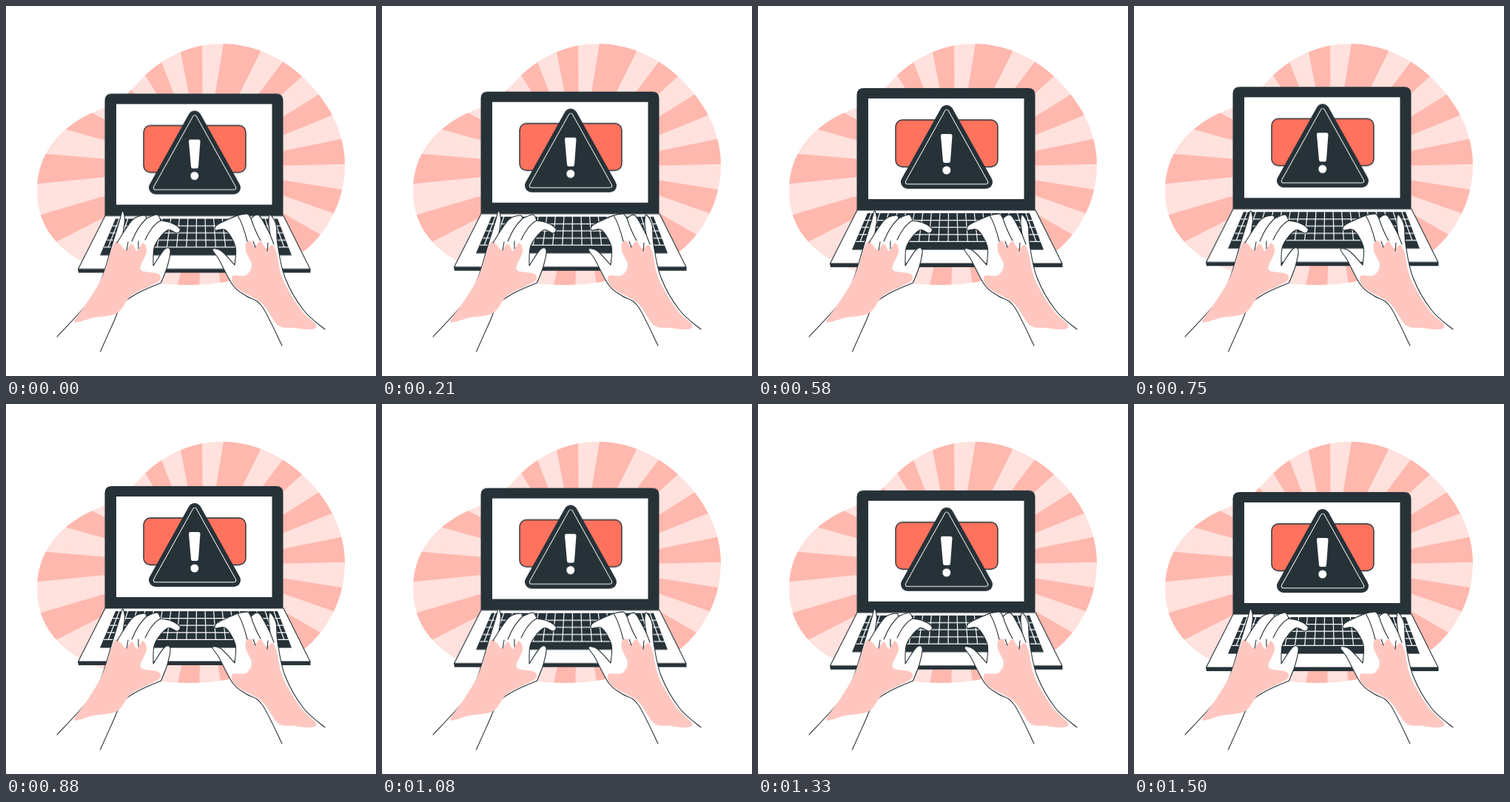
An HTML page for the animation above (1540 ms loop, 500 by 500 pixels).

```html
<!DOCTYPE html>
<html lang="en">
<head>
<meta charset="utf-8">
<title>Laptop warning</title>
<style>
  html, body { margin: 0; width: 100%; height: 100%; overflow: hidden; background: #fff; }
  svg { display: block; width: 100vw; height: 100vh; }
  .ink { fill: #263238; }
  .line { fill: none; stroke: #263238; stroke-width: 1.1; stroke-linecap: round; stroke-linejoin: round; }
  .skin { fill: #fff; }
  .shade { fill: #ffc7bf; }
  .sign { stroke-linejoin: round; }
  #laptop { animation: float 1540ms linear -40ms infinite; }
  @keyframes float { 50% { transform: translateY(-10px); } }
</style>
</head>
<body>
<svg viewBox="0 0 500 500">
  <defs>
    <path id="blob" d="M42 250C42 203 68 161 134 137C158 127 165 118 180 102C208 71 248 51 292 51C332 51 372 68 403 98C437 130 458 172 458 215C458 268 428 320 385 343C350 362 300 377 248 377C190 377 130 362 97 342C60 320 42 287 42 250Z"/>
    <clipPath id="blobClip"><use href="#blob"/></clipPath>
    <path id="triangle" d="M255 151L308 246H202Z"/>
  </defs>

  <use href="#blob" fill="#ffe1dd"/>
  <path id="rays" fill="#ffb8ae" clip-path="url(#blobClip)"/>

  <g id="laptop">
    <path class="line skin" d="M134 284H375L411 356H97.5Z"/>
    <path class="ink" d="M97 356H411.5V361H98Z"/>
    <path class="ink" d="M148 288H367L386 337.500H127Z"/>
    <path id="keys" fill="none" stroke="#fff" stroke-width="1.2"/>
    <path class="ink" d="M133.500 284V128Q133.500 119 143 119H365Q374.500 119 374.500 128V284Z"/>
    <path fill="#fff" d="M149 133H359.500V269H149Z"/>
    <rect x="186" y="162" width="138" height="63.500" rx="9" fill="#ff725e" stroke="#263238" stroke-width="1.4"/>
    <g class="sign ink">
      <use href="#triangle" stroke="#263238" stroke-width="18"/>
      <use href="#triangle" stroke="#fff" stroke-width="6.400"/>
      <use href="#triangle" stroke="#263238" stroke-width="4.600"/>
    </g>
    <path class="sign" fill="#fff" stroke="#fff" stroke-width="5" d="M249.500 183.500H260L257.500 217.500H252.500Z"/>
    <circle cx="254.800" cy="230" r="5.500" fill="#fff"/>
  </g>

  <g id="left">
    <path class="line skin"/>
    <path class="shade"/>
    <path class="line" d="M158 307L150 320M190 287Q178 298 170 318M209 290Q198 295 188 316M163 330L165 319M179 328V318"/>
  </g>
  <g id="right">
    <path class="line skin"/>
    <path class="shade"/>
    <path class="line" d="M313 283Q320 294 326 318M331 287Q336 303 344 317M357 309L362 322M337 326L334 318M353 331L354 320"/>
  </g>
</svg>
<script>
  const find = sel => document.querySelector(sel);
  const draw = (sel, d) => find(sel).setAttribute('d', d);

  // Sunburst: two fans of even wedges and a wider one in the seam between them
  const hub = { x: 266, y: 218 };
  const rim = deg => {
    const a = deg * Math.PI / 180;
    return `${hub.x + 300 * Math.cos(a)} ${hub.y - 300 * Math.sin(a)}`;
  };
  const wedge = (from, width) =>
    `M${hub.x} ${hub.y}L${rim(from)}L${rim(from + width)}Z`;
  const fan = (from, step, count) =>
    Array.from({ length: count }, (_, i) => wedge(from + i * step, step / 2)).join('');
  draw('#rays', fan(258, 20.65, 8) + wedge(63.5, 17) + fan(90.3, 21.2, 6));

  // Keyboard gaps: rows widen and columns fan out towards the viewer
  let gaps = '';
  for (let row = 1; row <= 4; row++) {
    const y = 288 + row * 9.6, spread = row * 3.9;
    gaps += `M${148 - spread} ${y}H${367 + spread}`;
  }
  for (let col = -9; col <= 9; col++) {
    gaps += `M${257.5 + col * 11.6} 288L${257 + col * 13.2} 326.3`;
  }
  draw('#keys', gaps);

  // Smooth curve through key points; "|" marks a sharp corner
  const parse = text => text.trim().split(/\s+/).map(p => p.split(',').map(Number));
  const spline = (pts, closed) => {
    const n = pts.length;
    const at = i => closed ? pts[(i + n) % n] : pts[Math.max(0, Math.min(n - 1, i))];
    let d = '';
    for (let i = 0; i < (closed ? n : n - 1); i++) {
      const [a, b, c, e] = [at(i - 1), at(i), at(i + 1), at(i + 2)];
      const p = b.map((v, k) => v + (c[k] - a[k]) / 6);
      const q = c.map((v, k) => v - (e[k] - b[k]) / 6);
      d += `C${p} ${q} ${c}`;
    }
    return d;
  };
  const outline = text => {
    const parts = text.split('|').map(parse);
    return `M${parts[0][0]}` + parts.map((part, i) =>
      spline(i ? [parts[i - 1].at(-1), ...part] : part)).join('');
  };
  const patch = text => {
    const pts = parse(text);
    return `M${pts[0]}${spline(pts, true)}Z`;
  };

  draw('#left .skin', outline(`69,447 110,402 128,372 143,324 153.5,290 157.5,277 160.5,288 158,307
    | 172,288 187,283 190,287 | 204,282 209,290
    | 223,293 235,301 231,307 218,303 201,324 199,351
    | 214,329 222,330 218,352 209.5,374 | 180,387 157,403 145,428 127.5,467`));
  draw('#left .shade', patch(`93,424 112,397 130,366 146,321 154,322 162,330 170,321
    177,331 185,320 190,332 182,356 206,362 205,373 170,391 150,415 119,421 97,427`));

  draw('#right .skin', outline(`373,459 346,406 325,392 307,378 288,343 279,329 291,331 309,350
    | 310,325 297,303 283,303 285,296 301,288 313,283
    | 326,281 331,287 | 342,283 357,309
    | 355,292 357,282 365,296 367,322 377,367 402,411 431,437`));
  draw('#right .shade', patch(`325,319 331,318 336,325 344,318 352,328 360,323 366,335
    374,369 398,410 419,431 412,437 389,435 367,431 346,402 311,381 306,365 324,364 332,350 324,331`));
</script>
</body>
</html>
```
